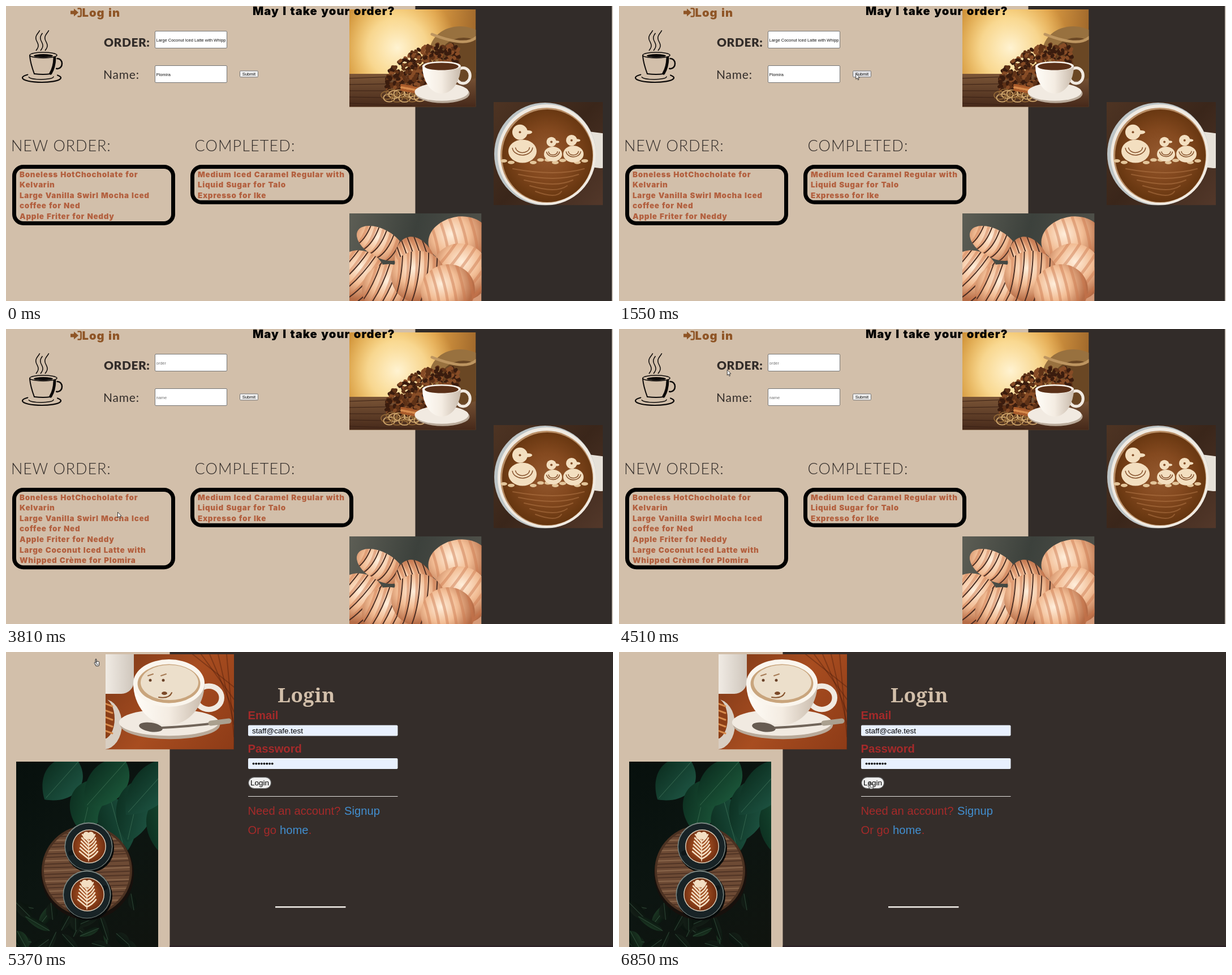
These frames come from a looping animation (1073x522 px, 8000 ms). An HTML page with a canvas:

```html
<!DOCTYPE html>
<html lang="en">
<head>
<meta charset="utf-8">
<title>Coffee orders</title>
<style>
html, body { margin: 0; width: 100%; height: 100%; overflow: hidden; background: #d2bfaa; }
canvas { display: block; width: 1073px; height: 522px; }
</style>
</head>
<body>
<canvas id="stage" width="1073" height="522"></canvas>
<script>
const W = 1073, H = 522, LOOP = 8000, TURN = Math.PI * 2;
const TAN = '#d2bfaa', DARK = '#322c29', INK = '#0c0908';
const SANS = '"Liberation Sans", Arial, sans-serif';
const HEAVY = 'Inter, "Open Sans", sans-serif';
const ROUND = 'Lato, "Open Sans", sans-serif';
const stage = document.getElementById('stage').getContext('2d');
let c = stage;

// ---- drawing helpers ----
function rect(color, x, y, w, h) {
  c.fillStyle = color;
  c.fillRect(x, y, w, h);
}
function oval(color, x, y, rx, ry = rx, rot = 0, from = 0, to = TURN) {
  c.fillStyle = color;
  c.beginPath();
  c.ellipse(x, y, rx, ry, rot, from, to);
  c.fill();
}
function ring(color, width, x, y, rx, ry = rx, from = 0, to = TURN) {
  c.strokeStyle = color;
  c.lineWidth = width;
  c.beginPath();
  c.ellipse(x, y, rx, ry, 0, from, to);
  c.stroke();
}
// line from (x, y) to (x2, y2), bowed sideways by the given amount
function line(color, width, x, y, x2, y2, bow = 0) {
  c.strokeStyle = color;
  c.lineWidth = width;
  c.lineCap = 'round';
  c.beginPath();
  c.moveTo(x, y);
  c.quadraticCurveTo((x + x2) / 2 + bow, (y + y2) / 2 + bow, x2, y2);
  c.stroke();
}
function wave(color, width, x, y, len, amp) {
  c.strokeStyle = color;
  c.lineWidth = width;
  c.beginPath();
  for (let s = 0; s <= len; s++) c.lineTo(x + amp * Math.sin(s / 5) + s * 0.12, y - s);
  c.stroke();
}
function box(fill, border, width, x, y, w, h, r) {
  c.beginPath();
  c.roundRect(x, y, w, h, r);
  if (fill) { c.fillStyle = fill; c.fill(); }
  if (border) { c.strokeStyle = border; c.lineWidth = width; c.stroke(); }
}
function text(str, x, y, font, color, spacing = 0, words = 0) {
  c.font = font;
  c.fillStyle = color;
  c.letterSpacing = spacing + 'px';
  c.wordSpacing = words + 'px';
  c.fillText(str, x, y);
}
function heavy(str, x, y, size, color) {
  text(str, x, y, `900 ${size}px ${HEAVY}`, color, size * 0.05, size * 0.07);
}
function blend(g, colors) {
  colors.forEach((s, i) => g.addColorStop(i / (colors.length - 1), s));
  return g;
}
const fade = (x0, y0, x1, y1, ...colors) => blend(c.createLinearGradient(x0, y0, x1, y1), colors);
const glow = (x, y, r, ...colors) => blend(c.createRadialGradient(x, y, 0, x, y, r), colors);
function photo(x, y, w, h, paint) {
  c.save();
  c.beginPath();
  c.rect(x, y, w, h);
  c.clip();
  c.translate(x, y);
  paint(w, h);
  c.restore();
}
function random(seed) {
  return () => (seed = (seed * 16807) % 2147483647) / 2147483647;
}

// ---- photos, each in its own coordinates ----
function cup(x, y, rx, ry, depth, drink) {
  oval('#b9aa9a', x + 2, y + depth, rx * 1.4, depth * 0.34);
  oval('#f1eae1', x, y + depth * 0.94, rx * 1.4, depth * 0.32);
  ring('#f1eae1', rx * 0.15, x + rx * 1.12, y + depth * 0.35, rx * 0.36, depth * 0.28);
  oval(fade(x - rx, 0, x + rx, 0, '#fffdf8', '#f4ece2', '#c8baab'), x, y, rx, depth, 0, 0, Math.PI);
  oval('#faf5ed', x, y, rx, ry);
  oval(drink, x, y + 1, rx * 0.88, ry * 0.82);
}

function beansPhoto(w, h) {
  rect(fade(0, 0, w, 20, '#cf9138', '#eeb95a', '#dc9c43', '#a26a2c'), 0, 0, w, h);
  rect(glow(85, 68, 105, '#fff3d2', 'rgba(253,226,160,.8)', 'rgba(250,210,120,0)'), 0, 0, w, h);
  rect(fade(0, 112, 0, h, '#7d5738', '#46291a'), 0, 114, w, h);
  for (let i = 0; i < 5; i++) line('#3a2115', 1, 0, 122 + i * 11, 110, 118 + i * 13);
  oval('#98713f', 196, 74, 54, 44);
  oval('#6a4724', 202, 88, 44, 38);
  line('#bd9560', 5, 146, 44, w, 50, 20);
  const rnd = random(11);
  for (let i = 0; i < 420; i++) {
    const a = rnd() * TURN, r = Math.sqrt(rnd());
    const u = Math.cos(a) * r * 76, v = Math.sin(a) * r * 32;
    oval(['#5f3217', '#3a1c0e', '#874c26'][i % 3], 130 + u * 0.85 + v * 0.4, 105 - u * 0.4 + v, 4.2, 3, rnd() * 3);
  }
  for (let i = 0; i < 14; i++)
    ring(i % 2 ? '#cfa66c' : '#8d6334', 1.8, 66 + i * 4.5, 152 + Math.sin(i * 2) * 5, 10, 7);
  for (let i = 0; i < 3; i++) line(i % 2 ? '#d78a4c' : '#ab5c2b', 4, 92, 134 + i * 4, 134, 142 + i * 4);
  cup(163, 100, 34, 8, 49, '#5a3018');
}

function duck(x, y, r) {
  const foam = '#f3dfc0', brown = '#85502a', hx = x - r * 0.18, hy = y - r * 1.35, hr = r * 0.54;
  oval(foam, x, y, r, r * 0.82);
  for (const k of [0.5, 0.72]) ring(brown, 1.5, x, y - r * 0.3, r * k, r * k * 0.8, 0.1, 3);
  oval(foam, hx, hy, hr);
  oval(foam, hx + hr, hy, hr * 0.6, hr * 0.25);
  oval(brown, hx, hy, 2);
}
function ducksPhoto(w, h) {
  rect(fade(0, 0, w, h, '#4e3423', '#3a261a', '#53382a'), 0, 0, w, h);
  line('#e6e1d8', 62, 158, 82, 190, 86);
  oval('#bcc4c6', 91, 92, 90, 91);
  oval('#f0eae1', 94, 93, 87, 89);
  oval('#b98e66', 94, 94, 82, 84);
  oval(glow(95, 92, 84, '#94592f', '#84491f', '#65350f'), 95, 95, 80, 82);
  for (let i = 0; i < 5; i++) line('rgba(181,122,74,.5)', 2, 34 + i * 10, 118 + i * 10, 160 - i * 10, 118 + i * 10, 14);
  for (let i = 0; i < 12; i++) oval('#e3c59a', 18 + i * 13, 104 + Math.sin(i * 2) * 3, 6, 3);
  duck(51, 87, 25);
  duck(105, 92, 16);
  duck(141, 92, 18);
}

function roll(x, y, rx, ry, rot, drizzle) {
  c.save();
  c.translate(x, y);
  c.rotate(rot);
  oval(glow(-rx * 0.2, -ry * 0.3, rx * 1.2, '#ffeedb', '#f2bd95', '#b66c46'), 0, 0, rx, ry);
  c.clip();
  for (let s = -0.8; s < 0.9; s += 0.32) {
    line('rgba(202,118,76,.45)', 5, s * rx, -ry, s * rx, ry, 8);
    if (drizzle) line('#4b2e23', 2, s * rx + 6, -ry, s * rx, ry, 8);
  }
  c.restore();
}
function pastryPhoto(w, h) {
  rect(fade(0, 0, w, 60, '#5d5e55', '#3c413c', '#50514a'), 0, 0, w, h);
  rect('#d59a78', 0, 95, w, h);
  roll(193, 46, 54, 40, -0.2, false);
  roll(197, 104, 52, 50, 0.7, false);
  roll(55, 53, 46, 25, 0.5, true);
  roll(118, 94, 36, 54, -0.3, true);
  for (let i = 0; i < 4; i++) roll(18 + i * 52, 112 + i % 2 * 24, 48, 46, 0.7 - i * 0.3, i < 3);
}

function bearPhoto(w, h) {
  rect(fade(0, 0, w, h, '#7c3818', '#a84d20', '#8d3b17'), 0, 0, w, h);
  for (let i = 0; i < 6; i++) line('rgba(75,28,10,.4)', 2, 154 + i * 15, 0, w, 58 + i * 22);
  box(fade(0, 0, 50, 0, '#f0ebe4', '#cfc6bc'), null, 0, -20, -20, 70, 90, 22);
  oval('#d8cec2', -2, 124, 31, 44);
  oval('#8c3f17', -4, 114, 20, 36);
  for (let i = 0; i < 5; i++) line('#d78b4c', 3, -4, 86 + i * 12, 12, 92 + i * 12);
  cup(112, 51, 63, 42, 74, '#c9a57d');
  oval('#ecdfcb', 113, 50, 51, 31);
  for (const x of [79, 102]) {
    oval('#694127', x, 46, 2.5);
    line('#a77c56', 2, x - 4, 38, x + 5, 35);
  }
  oval('#7c4a29', 104, 69, 5, 3);
  line('#87542e', 2, 94, 76, 117, 68, 7);
  oval('#665b51', 80, 129, 21, 8, 0.15);
  line('#706459', 4, 100, 130, 200, 121, 2);
  line('#aaa08f', 9, 186, 122, 218, 118);
}

function leaf(x, y, len, wide, rot, dark, light) {
  c.save();
  c.translate(x, y);
  c.rotate(rot);
  c.beginPath();
  for (const s of [-1, 1]) {
    c.moveTo(0, 0);
    c.bezierCurveTo(len * 0.15, s * wide, len * 0.7, s * wide, len, 0);
  }
  c.fillStyle = fade(0, -wide, 0, wide, light, dark);
  c.fill();
  line('rgba(120,180,140,.3)', 1, 0, 0, len * 0.95, 0);
  c.restore();
}
function latte(x, y, side) {
  const cream = '#f3dec2';
  oval('#070a0a', x + 2, y + 3, 43);
  oval('#7b8783', x, y, 42.5);
  oval('#182326', x, y + 0.5, 41);
  line('#0e1618', 8, x + side * 27, y - side * 10, x + side * 32, y - side * 12);
  oval('#d9cbb6', x + 1, y, 30);
  oval(glow(x, y, 30, '#a65525', '#97471d', '#6f2e11'), x + 1, y, 28.5);
  for (let i = 0; i < 6; i++)
    for (const s of [-1, 1]) line(cream, 2.6, x, y + 22 - i * 6, x + s * (16 - i), y + 9 - i * 6, 2);
  for (const s of [-1, 1]) oval(cream, x + s * 4, y - 19, 6, 7);
  line(cream, 1.5, x, y - 14, x, y + 26);
}
function plantsPhoto(w, h) {
  const rnd = random(29);
  rect(fade(0, 0, w, h, '#07100d', '#0c1511', '#10140f'), 0, 0, w, h);
  for (let i = 0; i < 7; i++)
    leaf(110 + i * 28, i % 3 * 32, 90 + i * 6, 44, 2.3 - i % 3 * 0.5, '#0b2c1e', i % 2 ? '#1d5a3c' : '#1f5745');
  for (let i = 0; i < 26; i++)
    leaf(rnd() * w, 255 + rnd() * 70, 30 + rnd() * 22, 7 + rnd() * 7, rnd() * 6, '#08110c', i % 4 ? '#152018' : '#1d3a25');
  oval('#17100c', 126, 198, 82);
  oval('#4b3121', 125, 193, 80);
  c.save();
  oval('#6d4a34', 125, 193, 76);
  c.clip();
  for (let i = 0; i < 26; i++) line(i % 3 ? '#503425' : '#8a664b', 2, 44, 122 + i * 6, 208, 114 + i * 6 + rnd() * 5);
  c.restore();
  latte(128, 150, -1);
  latte(125, 235, 1);
}

// ---- order page ----
function cupIcon() {
  for (let i = 0; i < 3; i++) wave(INK, 1.5, 53 + i * 8, 79, 36 - i % 2 * 5, 3);
  ring(INK, 1.6, 66, 87, 24, 5);
  oval(INK, 66, 88, 17, 3);
  line(INK, 2, 42, 88, 50, 120, -3);
  line(INK, 5, 86, 92, 79, 119, 3);
  line(INK, 2, 50, 120, 79, 120, 2);
  ring(INK, 2.5, 91, 102, 8, 9, -1.6, 1.8);
  ring(INK, 2.2, 63, 127, 34, 8, -0.6, 3.9);
  ring(INK, 1.5, 62, 125, 22, 5, 0, 3);
}
function loginIcon() {
  const brown = '#8f5526', mid = 11.5;
  rect(brown, 114, mid - 3, 7, 6);
  c.beginPath();
  c.moveTo(120, mid - 7);
  c.lineTo(128, mid);
  c.lineTo(120, mid + 7);
  c.fill();
  c.save();
  c.beginPath();
  c.rect(126.5, 0, 10, 24);
  c.clip();
  box(null, brown, 2.6, 118, mid - 7, 14.6, 14, 2);
  c.restore();
}
function list(x, lines) {
  box(null, '#000', 7, x + 3.5, 284.5, 281, 7 + lines.length * 18.6, 16);
  lines.forEach((s, i) => heavy(s, x + 13, 302.6 + i * 18.6, 13.5, '#b3603f'));
}
function field(y, value, hint) {
  box('#fff', '#767676', 1, 263.5, y, 127, 30, 1.5);
  text(value || hint, 265.5, y + 18, `7.5px ${SANS}`, value ? '#111' : '#757575');
}
function orderPage(sent) {
  rect(TAN, 0, 0, W, H);
  rect(DARK, 723.5, 0, 347.5, H);
  rect('#d3cbc3', 1071, 0, 2, H);
  photo(607, 6, 223.5, 172.5, beansPhoto);
  photo(862, 170, 193, 182.5, ducksPhoto);
  photo(607, 367, 233.5, 155, pastryPhoto);
  cupIcon();
  loginIcon();
  heavy('Log in', 134.5, 18.7, 20.2, '#8f5526');
  heavy('May I take your order?', 436, 15.5, 20.2, '#000');
  text('ORDER:', 173, 71.5, `900 21px ${ROUND}`, DARK, 0.5);
  text('Name:', 172, 129, `21px ${ROUND}`, DARK, 0.8);
  text('NEW ORDER:', 9, 257, `300 27px ${ROUND}`, DARK, 0.9);
  text('COMPLETED:', 333.5, 257, `300 27px ${ROUND}`, DARK, 1.1);
  field(44.5, sent ? '' : 'Large Coconut Iced Latte with Whipp', 'order');
  field(105.5, sent ? '' : 'Plomira', 'name');
  const orders = ['Boneless HotChocholate for', 'Kelvarin', 'Large Vanilla Swirl Mocha Iced',
    'coffee for Ned', 'Apple Friter for Neddy'];
  if (sent) orders.push('Large Coconut Iced Latte with', 'Whipped Crème for Plomira');
  list(11, orders);
  list(326, ['Medium Iced Caramel Regular with', 'Liquid Sugar for Talo', 'Expresso for Ike']);
}
function submitButton(hover, down) {
  const fill = down ? '#f5f5f5' : hover ? '#e2e2e6' : '#efefef';
  box(fill, down ? '#a0a0a0' : '#767676', 1, 413.5, 114.8, 32, 11, 1.5);
  text('Submit', 417.7, 123, `7.5px ${SANS}`, '#111');
}

// ---- login page ----
function loginPage() {
  const red = '#a52a2a', blue = '#428fd0', big = `20.2px ${SANS}`, small = `13.5px ${SANS}`;
  rect('#342d2a', 0, 0, W, H);
  rect(TAN, 0, 0, 289.5, H);
  rect('#2d2226', 289.5, 519.5, W, 3);
  photo(176, 4, 227, 168.5, bearPhoto);
  photo(18, 194, 251, 328, plantsPhoto);
  text('Login', 480, 89, '900 35px "Noto Serif", serif', TAN, 0.5);
  text('Email', 427.5, 119, 'bold ' + big, red);
  text('Password', 427.5, 177.8, 'bold ' + big, red);
  for (const y of [129.5, 188]) box('#e8f0fe', null, 0, 428, y, 264.5, 19, 2);
  text('staff@cafe.test', 435, 143.6, small, '#000');
  for (let i = 0; i < 8; i++) oval('#000', 437.5 + i * 4.75, 197.6, 1.9);
  box('#efefef', '#5d5d5d', 1.2, 428.6, 221.6, 40, 20, 10);
  text('Login', 432, 236.3, small, '#000');
  rect('#e6e3e0', 428, 255, 264.5, 1);
  text('Need an account?', 427.5, 288, big, red);
  text('Signup', 598, 288, big, blue);
  text('Or go', 427.5, 321.6, big, red);
  text('home', 484, 321.6, big, blue);
  text('.', 534.8, 321.6, big, red);
  rect('#f3efea', 476, 450, 124.5, 2.5);
}

// ---- pointer ----
const ARROW = new Path2D('M0 0V9.6L2.2 7.7 3.8 11.2 5.2 10.5 3.7 7.2 6.6 7Z');
function arrow(x, y) {
  c.save();
  c.translate(x, y);
  c.fillStyle = '#fff';
  c.fill(ARROW);
  c.strokeStyle = '#111';
  c.lineWidth = 0.8;
  c.stroke(ARROW);
  c.restore();
}
function hand(x, y) {
  line('#111', 2.6, x + 1.5, y + 7.5, x + 3.5, y + 10);
  box('#fff', '#111', 0.9, x + 2.6, y + 4.6, 6.6, 8.2, 2);
  box('#fff', '#111', 0.9, x + 2.6, y + 0.6, 1.8, 8, 0.9);
  line('#fff', 1.4, x + 1.5, y + 7.5, x + 4, y + 10);
  for (let i = 0; i < 3; i++) line('#111', 0.5, x + 4.6 + i * 1.4, y + 9, x + 4.6 + i * 1.4, y + 11);
}
// start, end, steps, target x and y, sideways bow
const moves = [
  [300, 1000, 10, 417, 119.5, 0],
  [1550, 1620, 2, 420.5, 120, 0],
  [3180, 3810, 9, 197.5, 324, 0],
  [3960, 4740, 11, 157, 16, 45],
  [5990, 6780, 11, 440, 230, 0]
];
function pointer(t) {
  let x = 1068, y = 528;
  for (const [t0, t1, n, tx, ty, bow] of moves) {
    if (t < t0) break;
    const step = Math.floor((t - t0) / (t1 - t0) * (n - 1) + 1.001);
    const p = Math.min(1, step / n), e = p * p * (3 - 2 * p);
    x += (tx - x) * e + bow * 4 * e * (1 - e);
    y += (ty - y) * e;
  }
  return [x, y];
}

function layer(paint) {
  const cv = document.createElement('canvas');
  cv.width = W;
  cv.height = H;
  c = cv.getContext('2d');
  paint();
  c = stage;
  return cv;
}
const before = layer(() => orderPage(false));
const after = layer(() => orderPage(true));
const login = layer(loginPage);

function draw(t) {
  const onLogin = t >= 5370;
  c.drawImage(onLogin ? login : t >= 2410 ? after : before, 0, 0);
  if (!onLogin) submitButton(t >= 1000 && t < 2410, t >= 2010 && t < 2170);
  if (t < 300) return;
  if (t >= 4820 && t < 5990) hand(155.5, 12);
  else if (t >= 6780) hand(t < 6850 ? 439 : 440, 230);
  else arrow(...pointer(t));
}

const start = performance.now();
function tick() {
  draw((performance.now() - start) % LOOP);
  requestAnimationFrame(tick);
}
tick();
</script>
</body>
</html>
```
